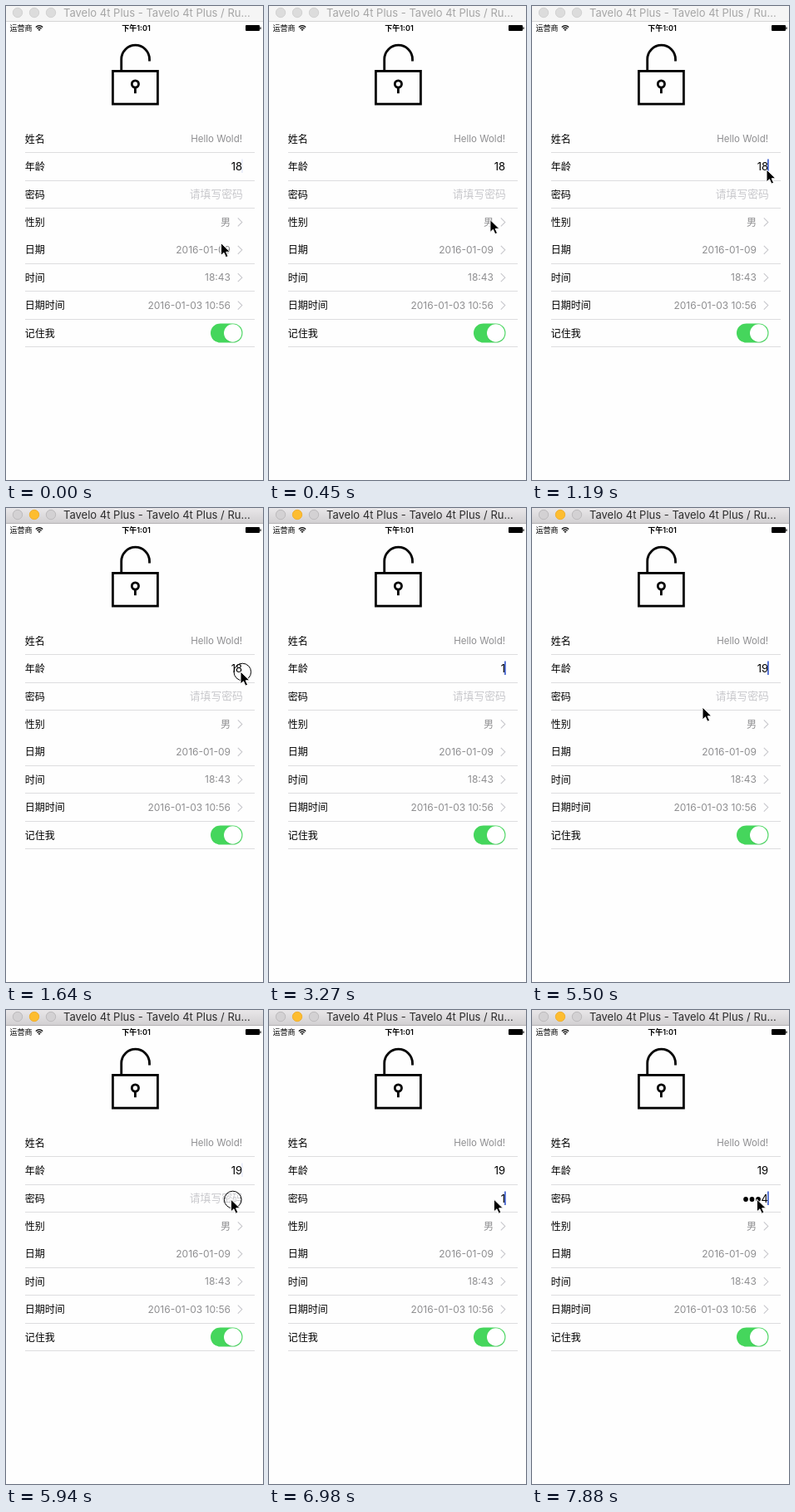
An HTML page that plays this animation: 309x571 px, repeating every 8000 ms.

```html
<!DOCTYPE html>
<html lang="zh-CN">
<head>
<meta charset="utf-8">
<title>Form</title>
<style>
html, body { margin: 0; width: 100%; height: 100%; overflow: hidden; background: #fefefe }
svg { display: block; width: 309px; height: 571px; font: 12px Inter, "Noto Sans CJK SC", "Noto Sans CJK", sans-serif }
.end { text-anchor: end }
.grey { fill: #8e8e90 }
.line { fill: none; stroke: #000; stroke-width: 2.8 }
</style>
</head>
<body>
<svg viewBox="0 0 309 571">
  <defs>
    <linearGradient id="bar" x2="0" y2="1">
      <stop stop-color="#e9e7e9"/><stop offset="1" stop-color="#d2d0d2"/>
    </linearGradient>
  </defs>
  <rect width="309" height="571" fill="#fefefe"/>

  <rect id="titlebar" width="309" height="18"/>
  <path id="edge" d="M0 18.5H309"/>
  <g id="lights">
    <circle cx="14" cy="8" r="5.7"/><circle cx="34" cy="8" r="5.7"/><circle cx="54" cy="8" r="5.7"/>
  </g>
  <text id="title" x="69" y="13" font-size="13">Tavelo 4t Plus - Tavelo 4t Plus / Ru...</text>

  <g font-size="9">
    <text x="4.6" y="30">运营商</text>
    <text x="156.5" y="30" text-anchor="middle" font-weight="600">下午1:01</text>
  </g>
  <g fill="none" stroke="#000" stroke-width="1.3">
    <path d="M35.8 25.4Q40 21.8 44.2 25.4M37.4 27.2Q40 25 42.6 27.2"/>
  </g>
  <path d="M38.4 28.3Q40 27 41.6 28.3L40 30Z"/>
  <rect x="288" y="23" width="17" height="7" rx="1"/>
  <rect x="305.4" y="25.2" width="1.2" height="2.8" rx=".6"/>

  <g class="line">
    <rect x="128.4" y="78.4" width="54" height="39.7"/>
    <path d="M138.7 78V64.1A16.9 16.9 0 0 1 172.5 64.1V66.5M155.4 98V105.3"/>
    <circle cx="155.4" cy="94" r="4.1"/>
  </g>

  <g id="rows"></g>
  <text id="age" class="end" x="284" y="197.6" font-size="13"></text>
  <text id="hint" class="end" x="284.8" y="231" font-size="12.8" fill="#c8c8cc">请填写密码</text>
  <g id="dots">
    <circle cx="272" cy="228" r="2.9"/><circle cx="264.5" cy="228" r="2.9"/><circle cx="257" cy="228" r="2.9"/>
  </g>
  <text id="digit" class="end" x="284" y="231.6" font-size="13"></text>
  <rect id="caret" x="283" width="1.8" height="16.5" fill="#4a69d2"/>

  <rect x="246" y="382.4" width="38.5" height="23.2" rx="11.6" fill="#45d65c"/>
  <circle cx="272.6" cy="394.8" r="10.7" fill="#2f9c42" opacity=".25"/>
  <circle cx="272.7" cy="394" r="10.7" fill="#fff"/>

  <g id="pointer">
    <circle id="ring" cx="2.3" cy=".5" r="10.3" fill="none" stroke="#000"/>
    <path d="M0 0V15L3.5 11.8 5.9 17.2 8.6 16 6.2 10.8H11Z" stroke="#fff" stroke-width="1" stroke-linejoin="round"/>
  </g>
</svg>
<script>
const $ = id => document.getElementById(id);
const rowY = i => 160 + 33.4 * i;

const rows = [
  ["姓名", "Hello Wold!", 284, 11.5], ["年龄"], ["密码"], ["性别", "男", 270],
  ["日期", "2016-01-09", 270], ["时间", "18:43", 270],
  ["日期时间", "2016-01-03 10:56", 270], ["记住我"]
];
$("rows").innerHTML = rows.map(([label, value = "", x = 284, size = 12], i) => {
  const y = rowY(i);
  const rule = i === 3 ? "" : `<path d="M23 ${Math.round(y + 16.4) + .5}H299" stroke="#dddddf"/>`;
  const chevron = x === 270
    ? `<path d="M278.8 ${y - 4.8}l5 5-5 5" fill="none" stroke="#c7c7cc" stroke-width="1.1"/>` : "";
  return `<text x="22.7" y="${y + 4.7}">${label}</text>
    <text class="end grey" x="${x}" y="${y + 4.4}" font-size="${size}">${value}</text>${rule}${chevron}`;
}).join("");

// Last value whose start time has passed, from [time, value] pairs
const at = (steps, t) => steps.reduce((v, s) => t >= s[0] ? s[1] : v, steps[0][1]);

const ageText = [[0, "18"], [3120, "1"], [4610, "19"]];
const secret = [[0, ""], [6980, "1"], [7130, "12"], [7580, "123"], [7880, "1234"]];
const caretAlpha = [[0, .12], [150, 0], [590, 1], [1640, 0], [1930, 1], [2680, 0], [2970, .6],
  [3120, 1], [4310, 0], [4610, 1], [4900, .5], [5050, 0], [5500, 1], [5940, .12], [6090, .6], [6240, 1]];
const sweep = [[5050, [282, 197]], [5200, [297, 225]], [5350, [262, 252]], [5500, [205, 240]], [5650, [270.4, 228]]];

function pointerAt(t) {
  if (t >= 5050) return at(sweep, t);
  if (t >= 2080) return null;
  const p = Math.max(0, Math.min(8, Math.floor((t - 150) / 148.5) + 1)) / 8;
  const e = p * p * (3 - 2 * p);
  return [258.5 + 23.5 * e, 285.5 - 88.5 * e];
}

const show = (el, on) => el.setAttribute("visibility", on ? "inherit" : "hidden");

function setWindow(active) {
  $("titlebar").setAttribute("fill", active ? "url(#bar)" : "#f5f5f5");
  $("edge").setAttribute("stroke", active ? "#b5b3b5" : "#d6d6d6");
  $("title").setAttribute("fill", active ? "#2c2c2c" : "#a6a6a6");
  [...$("lights").children].forEach((light, i) => {
    const yellow = active && i === 1;
    light.setAttribute("fill", yellow ? "#fdbd30" : active ? "#d3d1d3" : "#dcdcdc");
    light.setAttribute("stroke", yellow ? "#f0b030" : active ? "#bdbbbd" : "#d2d2d2");
  });
}

function draw(now) {
  const t = now % 8000;
  setWindow(t >= 1640);
  $("age").textContent = at(ageText, t);

  const typed = at(secret, t);
  show($("hint"), !typed);
  $("digit").textContent = typed.slice(-1);
  [...$("dots").children].forEach((dot, i) => show(dot, i < typed.length - 1));

  $("caret").setAttribute("y", t < 6090 ? 184.5 : 218.5);
  $("caret").setAttribute("opacity", at(caretAlpha, t));

  const pos = pointerAt(t);
  show($("pointer"), pos);
  if (pos) $("pointer").setAttribute("transform", `translate(${pos})`);
  show($("ring"), pos && (t >= 1640 && t < 1780 || t >= 5800 && t < 6090));
  requestAnimationFrame(draw);
}
draw(performance.now());
</script>
</body>
</html>
```
